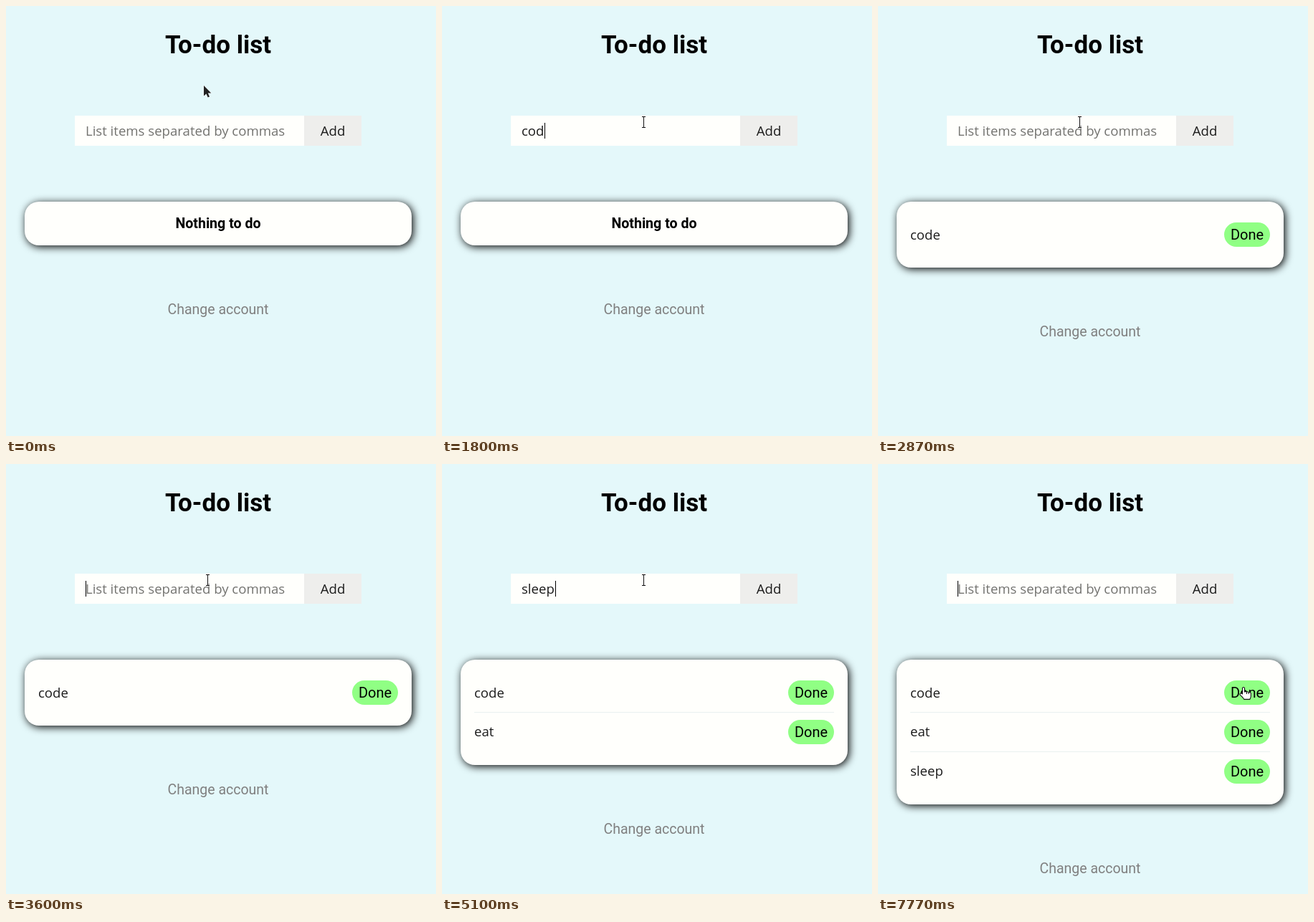
Recreate the animation shown at these times as an HTML page. Size 600x600 px, loop 8 s.

```html
<!DOCTYPE html>
<html lang="en">
<head>
<meta charset="utf-8">
<title>To-do list</title>
<style>
  html, body { margin: 0; width: 100%; height: 100%; overflow: hidden; background: #e4f8fa; }
  #card { position: absolute; left: 26px; top: 273px; width: 540px; border-radius: 20px;
    background: #fffffc; box-shadow: 2px 2px 12px #000; }
  svg { position: absolute; left: 0; top: 0; }
  text { font: 18.6px "Open Sans", "Noto Sans", sans-serif; fill: #1c1c1c; white-space: pre; }
  .mid { text-anchor: middle; }
  .ui { font-family: Roboto, sans-serif; fill: #000; }
  #title { font-size: 35px; font-weight: 700; }
  #none { font-size: 19.6px; font-weight: 700; }
  #account { font-size: 19.5px; fill: #808080; }
  #hint { fill: #737370; }
  .done { font-size: 20px; }
  #menu text { font-size: 16px; }
  #menu rect { filter: drop-shadow(0 1px 2px rgba(0, 0, 0, .4)); }
</style>
</head>
<body>
<div id="card"></div>
<svg width="600" height="600" viewBox="0 0 600 600">
  <text id="title" class="ui mid" x="296" y="66">To-do list</text>
  <rect x="96" y="153" width="320" height="42" fill="#fffffc"/>
  <rect x="416" y="153" width="80" height="42" fill="#eeeeec"/>
  <text class="mid" x="456" y="181">Add</text>
  <text id="hint" x="111" y="181">List items separated by commas</text>
  <text id="typed" x="111" y="181"></text>
  <rect id="caret" y="163" width="1" height="22"/>
  <text id="none" class="ui mid" x="296" y="310">Nothing to do</text>
  <text id="account" class="ui mid" x="296">Change account</text>
  <g id="rows"></g>
  <g id="menu"><rect x="96" y="197" width="320" height="232" rx="3" fill="#fffffc"/></g>
  <path id="arrow" d="M0 0V14.5L3.4 11.4L5.7 16.6L8 15.6L5.8 10.5H10.3Z"
    fill="#222" stroke="#fff" stroke-width="1" paint-order="stroke"/>
  <g id="beam" fill="none">
    <path d="M-2.5 -7.5H2.5M0 -7.5V7.5M-2.5 7.5H2.5" stroke="#fff" stroke-width="2.4" opacity=".7"/>
    <path d="M-2.5 -7.5H2.5M0 -7.5V7.5M-2.5 7.5H2.5" stroke="#111"/>
  </g>
  <path id="hand" d="M-1.5 0.5Q0 -1.6 1.5 0.5V6Q3.2 4.6 4.4 6.2Q6 5 7.2 6.8Q9 5.8 10.3 7.6V12Q10.3 14 8.8 16.4H0.8Q-0.6 13.6 -4.6 10.4Q-5.6 8.6 -3.8 8Q-2.6 7.8 -1.5 9Z M4.4 6.2V9M7.2 6.8V9"
    fill="#fff" stroke="#111" stroke-width="1.1" stroke-linejoin="round"/>
</svg>
<script>
const LOOP = 8000, SLIDE = 400, ROW = 55;
const $ = id => document.getElementById(id);
const show = (el, on) => { el.style.display = on ? '' : 'none'; };
const last = (list, t) => list.filter(e => e[0] <= t).pop();

// time, input text
const typing = [
  [0, ''],
  [1540, 'c'], [1660, 'co'], [1800, 'cod'], [1940, 'code'], [2140, ''],
  [2970, 'e'], [3030, 'ea'], [3100, 'eat'], [3570, ''],
  [4300, 's'], [4400, 'sl'], [4500, 'sle'], [4600, 'slee'], [4700, 'sleep'], [5140, '']
];
// time, caret visible
const blink = [
  [0, 0], [700, 1], [1200, 0], [1540, 1], [2440, 0], [2940, 1], [3630, 0],
  [4140, 1], [5200, 0], [5700, 1], [6300, 0], [6770, 1], [7270, 0], [7700, 1]
];
// time, pointer x, y
const moves = [
  [0, 276, 111], [100, 276, 111], [560, 276, 163.5], [1200, 276, 163.5],
  [1400, 281, 161.5], [6800, 281, 161.5], [7570, 510, 311.5], [LOOP, 510, 311.5]
];
const items = [
  { name: 'code', at: 2312, base: 326 },
  { name: 'eat', at: 3635, base: 380 },
  { name: 'sleep', at: 5155, base: 435 }
];

const add = (parent, tag, attrs, label) => {
  const el = document.createElementNS('http://www.w3.org/2000/svg', tag);
  for (const k in attrs) el.setAttribute(k, attrs[k]);
  if (label) el.textContent = label;
  return parent.appendChild(el);
};

['javascript', '123', 'd3js', 'visualisation', 'misis', 'algorithms'].forEach((s, i) =>
  add($('menu'), 'text', { x: 108, y: 229 + 36 * i }, s));

items.forEach((item, i) => {
  const y = 302 + ROW * i;
  item.line = i && add($('rows'), 'rect', { x: 45, y: y - 11, width: 502, height: 1, fill: '#e9f1f0' });
  item.el = add($('rows'), 'g', {});
  add(item.el, 'text', { x: 45, y: item.base }, item.name);
  add(item.el, 'rect', { x: 483, y, width: 64, height: 34, rx: 17, fill: '#90ff84' });
  add(item.el, 'text', { x: 515, y: y + 24, class: 'ui mid done' }, 'Done');
});

// cubic-bezier(.25, .1, .25, 1)
function ease(p) {
  if (p <= 0 || p >= 1) return p <= 0 ? 0 : 1;
  const curve = (a, b, s) => 3 * a * s * (1 - s) ** 2 + 3 * b * s * s * (1 - s) + s ** 3;
  let lo = 0, hi = 1;
  for (let i = 0; i < 20; i++) {
    const m = (lo + hi) / 2;
    if (curve(.25, .25, m) < p) lo = m; else hi = m;
  }
  return curve(.1, 1, lo);
}

function pointer(t) {
  const i = moves.findIndex(m => m[0] > t);
  const [t0, x0, y0] = moves[i - 1], [t1, x1, y1] = moves[i];
  const p = (t - t0) / (t1 - t0), q = p * p * (3 - 2 * p);
  return [x0 + (x1 - x0) * q, y0 + (y1 - y0) * q];
}

function draw(t) {
  const text = last(typing, t)[1];
  $('typed').textContent = text;
  show($('hint'), !text);
  show($('caret'), last(blink, t)[1]);
  $('caret').setAttribute('x', 111 + (text ? Math.round($('typed').getComputedTextLength()) + 1 : 0));
  show($('menu'), t >= 770 && t < 1540);

  let count = 0;
  for (const item of items) {
    const on = t >= item.at, p = ease((t - item.at) / SLIDE);
    count += on;
    show(item.el, on);
    if (item.line) show(item.line, on);
    item.el.setAttribute('transform', `translate(0 ${ROW * (p - 1)})`);
    item.el.setAttribute('opacity', p);
  }
  const height = count ? 37 + ROW * count : 61;
  $('card').style.height = height + 'px';
  $('account').setAttribute('y', 273 + height + 96);
  show($('none'), !count);

  const [x, y] = pointer(t);
  const inField = x > 96 && x < 416 && y > 153 && y < 195;
  const onDone = x > 483 && x < 547 && y > 302 && y < 336;
  const kind = inField ? 'beam' : onDone ? 'hand' : 'arrow';
  for (const id of ['arrow', 'beam', 'hand']) show($(id), id === kind);
  const snap = v => kind === 'beam' ? Math.floor(v) + .5 : Math.round(v);
  $(kind).setAttribute('transform', `translate(${snap(x)} ${Math.round(y)})`);
}

let start;
function tick(now) {
  start ??= now;
  draw((now - start) % LOOP);
  requestAnimationFrame(tick);
}
draw(0);
requestAnimationFrame(tick);
</script>
</body>
</html>
```
